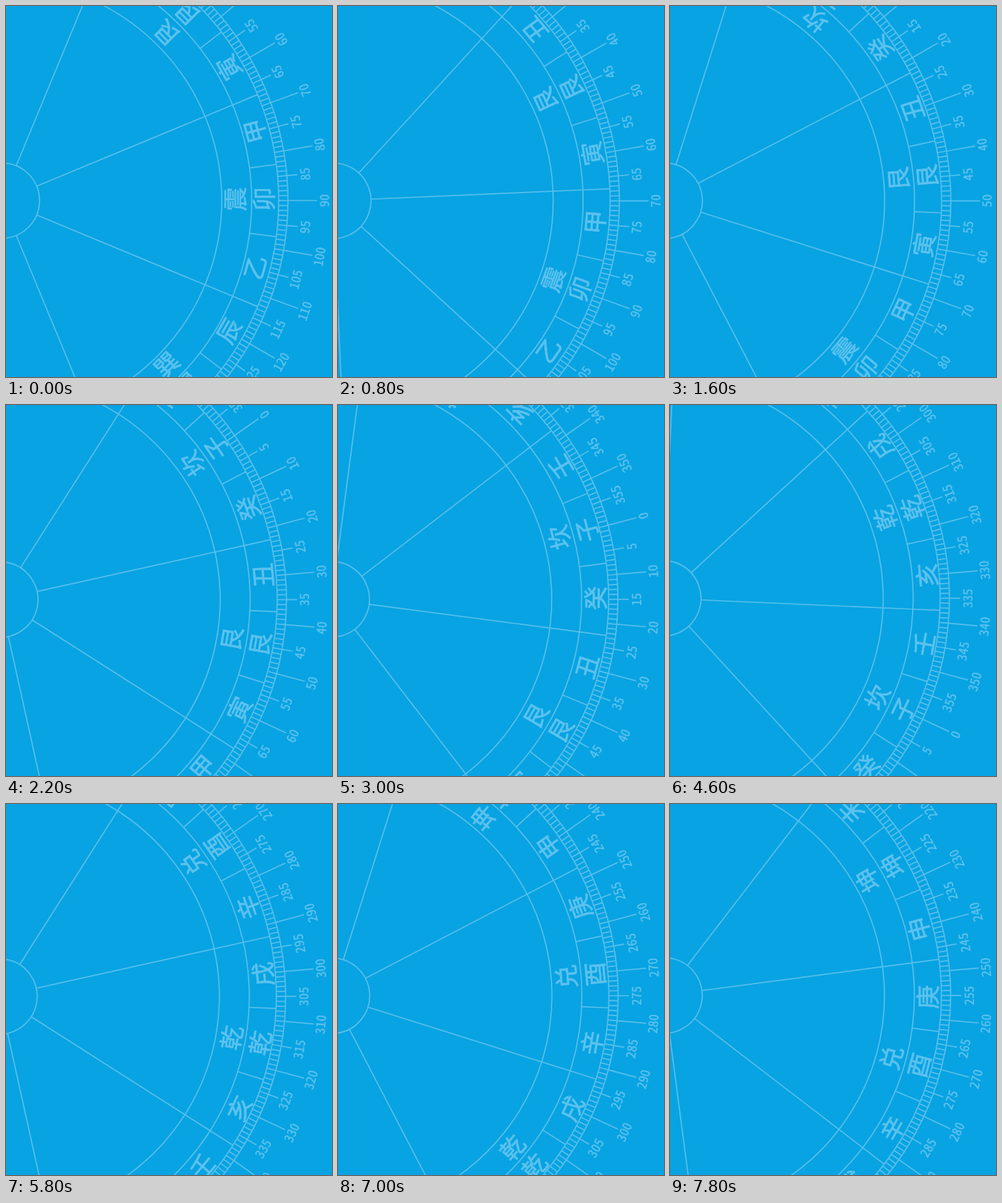
Recreate the animation shown at these times as an HTML page. Size 458x521 px, loop 8 s.

```html
<!DOCTYPE html>
<html lang="zh">
<head>
<meta charset="utf-8">
<style>
html, body { margin: 0; width: 100%; height: 100%; overflow: hidden; background: #08a3e2; }
svg { display: block; }
path, circle { fill: none; stroke: #56bfec; stroke-width: 1.7; }
text { fill: #5cc2ee; stroke: #5cc2ee; text-anchor: middle; }
.sign { font: 34px "Noto Sans CJK SC", sans-serif; stroke-width: .7; }
.num { font: 18px "Noto Sans Mono CJK SC", "Noto Sans CJK SC", sans-serif; stroke-width: .4; }
</style>
</head>
<body>
<svg width="458" height="521" viewBox="0 0 458 521"><g id="dial"></g><g id="signs"></g></svg>
<script>
const MOUNTAINS = '子癸丑艮寅甲卯乙辰巽巳丙午丁未坤申庚酉辛戌乾亥壬';
const TRIGRAMS = '坎艮震巽离坤兑乾';
const LOOP = 8000, STEP_MS = 200, STEP_DEG = 5;
const PIVOT = [-7.1, 271.2], OFFSET = [1.2, 2.05]; // the dial sits slightly off the pivot, the signs do not
const dial = document.getElementById('dial');
const signs = document.getElementById('signs');

function add(parent, tag, attrs, text = '') {
  const el = document.createElementNS('http://www.w3.org/2000/svg', tag);
  for (const key in attrs) el.setAttribute(key, attrs[key]);
  el.textContent = text;
  parent.appendChild(el);
}

// Bearing 90 points right, bearings grow clockwise.
function spoke(bearing, r1, r2) {
  const a = (bearing - 90) * Math.PI / 180;
  const at = r => `${(r * Math.cos(a)).toFixed(2)} ${(r * Math.sin(a)).toFixed(2)}`;
  return `M${at(r1)}L${at(r2)}`;
}

// Text tops face the centre.
function label(parent, text, bearing, r, cls) {
  add(parent, 'text', {
    class: cls, dy: '.37em',
    transform: `rotate(${bearing - 90}) translate(${r}) rotate(-90)`
  }, text);
}

for (const r of [53, 309, 351, 389, 402]) add(dial, 'circle', { r });

let lines = '';
for (let b = 0; b < 360; b++) {
  lines += spoke(b, 389, 402);
  if (b % 5) continue;
  const long = b % 10 === 0;
  lines += spoke(b, 402, long ? 443 : 417);
  label(dial, b, b, long ? 453 : 427.7, 'num');
}
[...MOUNTAINS].forEach((sign, i) => {
  lines += spoke(i * 15 + 7.5, 351, 389);
  label(signs, sign, i * 15, 370, 'sign');
});
[...TRIGRAMS].forEach((sign, i) => {
  lines += spoke(i * 45 + 22.5, 53, 351);
  label(signs, sign, i * 45, 329.5, 'sign');
});
add(dial, 'path', { d: lines });

function draw(time) {
  const angle = Math.floor(time % LOOP / STEP_MS) * STEP_DEG;
  const turn = `translate(${PIVOT}) rotate(${angle})`;
  signs.setAttribute('transform', turn);
  dial.setAttribute('transform', `${turn} translate(${OFFSET})`);
}

const start = performance.now();
function tick() {
  draw(performance.now() - start);
  requestAnimationFrame(tick);
}
tick();
</script>
</body>
</html>
```
